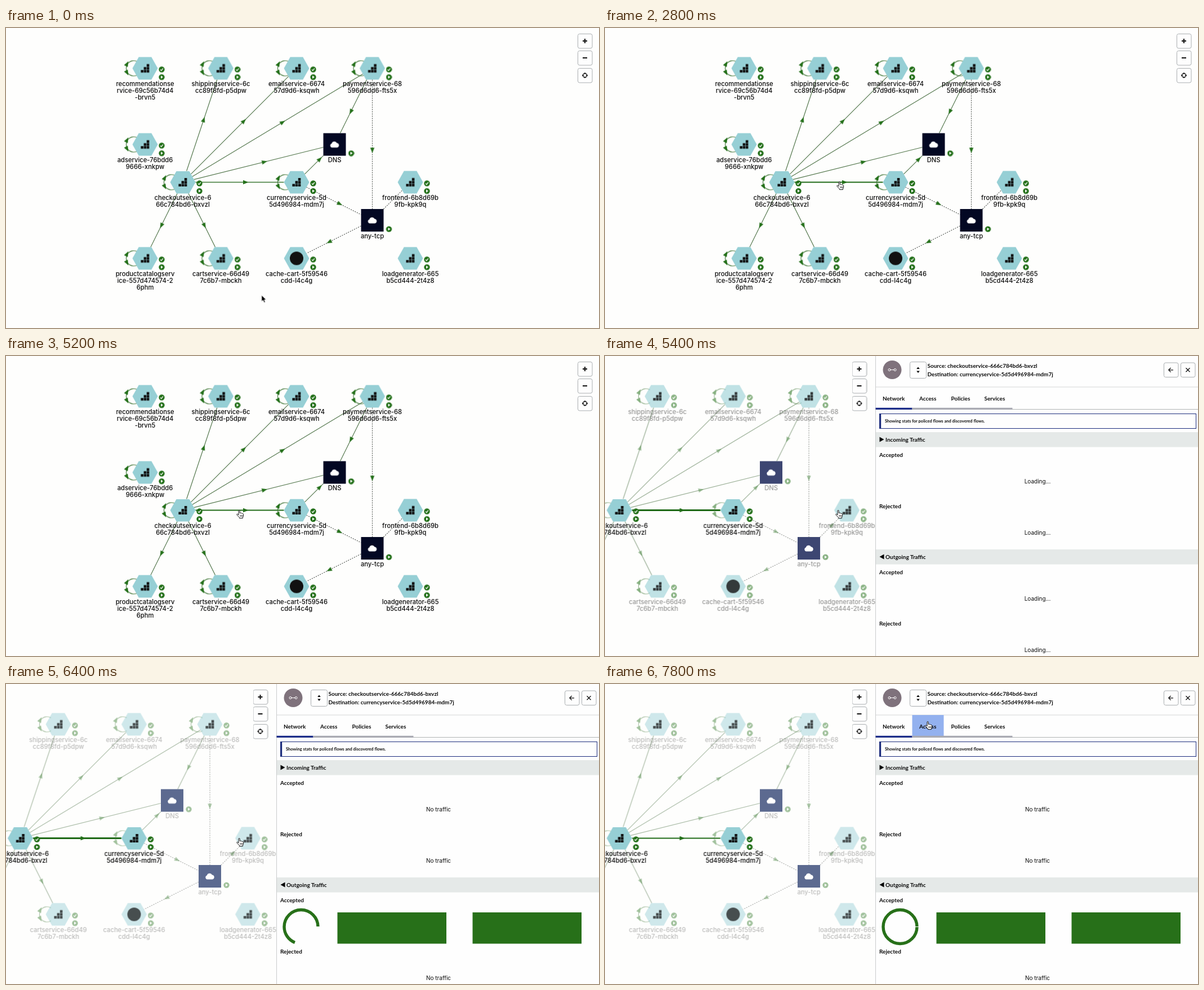
An HTML page that plays this animation: 1053x532 px, repeating every 8000 ms.

```html
<!DOCTYPE html>
<html lang="en">
<head>
<meta charset="utf-8">
<title>Service map</title>
<style>
html, body { margin: 0; width: 100%; height: 100%; overflow: hidden; background: #fefefd; }
svg { display: block; }
text { fill: #0c0c0c; }
.label { font: 500 11.2px Inter, sans-serif; text-anchor: middle; }
.note { font: 10px Inter, sans-serif; text-anchor: middle; }
.lato { font: 700 10px Lato, sans-serif; }
.info { font: 700 7.5px Lato, sans-serif; }
.hex { fill: #96cfd5; }
.box { fill: #030823; }
.edge { fill: none; stroke: #56794f; stroke-width: 1.2; }
.loop { fill: none; stroke: #457a3d; stroke-width: 1.1; }
.dots { stroke: #4a4f4a; stroke-width: 1.1; stroke-dasharray: 2 2; }
.tip, .badge { fill: #24701a; }
.mark { fill: none; stroke: #fff; stroke-width: 1.3; }
.btn { fill: #fefefe; stroke: #a9adb0; }
.ico { fill: none; stroke: #111; stroke-width: 2; }
.thin { stroke-width: 1.3; }

/* 2.5% of the loop is one 200 ms step */
.dim, .box, .main, .late, #graph, #tools, #panel, .wait, .done, #ring, #tab, #cursor, #arrow, #hand {
  animation: 8s step-end infinite;
}
.dim { animation-name: dim; }
.box { animation-name: box; }
.main { animation-name: main; }
.late { animation-name: late; }
#graph { animation-name: graph; }
#tools { animation-name: tools; }
#panel { animation-name: open; }
.wait { animation-name: wait; }
.done { animation-name: done; }
#ring { animation-name: ring; }
#tab { animation-name: tab; }
#cursor { animation-name: move; }
#arrow { animation-name: arrow; }
#hand { animation-name: hand; }

@keyframes dim { 0% { opacity: 1 } 67.5% { opacity: var(--a) } 70%, 100% { opacity: var(--b) } }
@keyframes box { 0% { fill: #030823 } 67.5% { fill: #3d4672 } 70%, 100% { fill: #5c6a90 } }
@keyframes main {
  0% { stroke-width: 1.3; stroke: #3b7733 }
  30% { stroke-width: 2.2; stroke: #1f6a17 }
  67.5% { stroke-width: 2.8; stroke: #1f6a17 }
  92.5%, 100% { stroke-width: 2.2; stroke: #1f6a17 }
}
@keyframes late { 0% { opacity: 0 } 67.5%, 100% { opacity: 1 } }
@keyframes graph { 0% { transform: none } 67.5%, 100% { transform: translate(-288.5px, 0) } }
@keyframes tools { 0% { transform: none } 67.5%, 100% { transform: translate(-576.5px, 0) } }
@keyframes open { 0% { opacity: 0 } 67.5%, 100% { opacity: 1 } }
@keyframes wait { 0% { opacity: 1 } 70%, 100% { opacity: 0 } }
@keyframes done { 0% { opacity: 0 } 70%, 100% { opacity: 1 } }
@keyframes tab { 0% { opacity: 0 } 95%, 100% { opacity: 1 } }
@keyframes ring {
  0% { stroke-dasharray: 0 200 }
  75% { stroke-dasharray: 15 200 }
  77.5% { stroke-dasharray: 43 200 }
  80% { stroke-dasharray: 69 200 }
  82.5% { stroke-dasharray: 83 200 }
  85% { stroke-dasharray: 92 200 }
  87.5% { stroke-dasharray: 97 200 }
  90%, 100% { stroke-dasharray: 100 200 }
}
@keyframes move {
  0% { transform: translate(453.5px, 473.5px) }
  20% { transform: translate(447px, 430px) }
  22.5% { transform: translate(433.5px, 365.5px) }
  25% { transform: translate(422px, 304px) }
  27.5% { transform: translate(415px, 280px) }
  30% { transform: translate(411px, 272px) }
  62.5% { transform: translate(409px, 273px) }
  92.5% { transform: translate(468px, 188px) }
  95% { transform: translate(562px, 76px) }
  97.5%, 100% { transform: translate(568px, 66px) }
}
@keyframes arrow { 0% { opacity: 1 } 30% { opacity: 0 } 92.5% { opacity: 1 } 95%, 100% { opacity: 0 } }
@keyframes hand { 0% { opacity: 0 } 30% { opacity: 1 } 92.5% { opacity: 0 } 95%, 100% { opacity: 1 } }
</style>
</head>
<body>
<svg width="1053" height="532" viewBox="0 0 1053 532">
  <g id="graph"></g>
  <g id="tools">
    <rect class="btn" x="1015.5" y="10.5" width="25.5" height="25.5" rx="3"/>
    <rect class="btn" x="1015.5" y="40.5" width="25.5" height="25.5" rx="3"/>
    <rect class="btn" x="1015.5" y="71.5" width="25.5" height="25.5" rx="3"/>
    <path class="ico" d="M1024 23h8M1028 19v8M1024 53h8"/>
    <circle class="ico thin" cx="1028" cy="84" r="3.6"/>
    <path class="ico thin" d="M1028 79v3M1028 86v3M1023 84h3M1030 84h3"/>
  </g>
  <g id="panel"></g>
  <g id="cursor">
    <path id="arrow" d="M.3.3V11.6L3 9.2 4.9 13.4 6.9 12.5 5.1 8.5H8.6Z" fill="#000" stroke="#fff" stroke-width=".8"/>
    <g id="hand" stroke="#111" stroke-linejoin="round">
      <path fill="#fff" d="M4 9V1.8Q4 .6 5 .6 6.2.6 6.2 1.8V5.5Q8 4.9 8.4 5.8 10 5.2 10.5 6.4 12.5 6 12.6 7.6V10Q12.6 12 11.4 13V14.6H5.4V13.2Q3 11 1 8.6.4 7.4 1.5 7.2 2.6 7 4 9Z"/>
      <path d="M7 9v3M8.9 9v3M10.7 9v3" stroke-width=".8"/>
    </g>
  </g>
</svg>
<script>
const el = id => document.getElementById(id);
const text = (x, y, s, cls) => `<text x="${x}" y="${y}" class="${cls}">${s}</text>`;

// id: [x, y, label lines, kind]; "loop" marks a self-connected pod
const nodes = {
  recommend: [247, 71.5, 'recommendationse|rvice-69c56b74d4|-brvn5', 'loop'],
  shipping: [381.5, 71.5, 'shippingservice-6c|cc89f8fd-p5dpw', 'loop'],
  email: [516, 71.5, 'emailservice-6674|57d9d6-ksqwh', 'loop'],
  payment: [650.5, 71.5, 'paymentservice-68|596d6dd6-fts5x', 'loop'],
  ad: [247, 206.5, 'adservice-76bdd6|9666-xnkpw', 'loop'],
  dns: [583.5, 206.5, 'DNS', 'cloud'],
  checkout: [314, 273.5, 'checkoutservice-6|66c784bd6-bxvzl', 'loop'],
  currency: [516, 273.5, 'currencyservice-5d|5d496984-mdm7j', 'loop'],
  frontend: [718, 273.5, 'frontend-6b8d69b|9fb-kpk9q', 'pod'],
  tcp: [650.5, 341, 'any-tcp', 'cloud'],
  catalog: [247, 408.5, 'productcatalogserv|ice-557d474574-2|6phm', 'loop'],
  cart: [381.5, 408.5, 'cartservice-66d49|7c6b7-mbckh', 'loop'],
  cache: [516, 408.5, 'cache-cart-5f59546|cdd-l4c4g', 'disc'],
  load: [718, 408.5, 'loadgenerator-665|b5cd444-2t4z8', 'pod']
};
const solid = 'checkout shipping,checkout email,checkout payment,checkout dns,checkout currency,checkout catalog,checkout cart,payment dns,currency dns';
const dotted = 'payment tcp,currency tcp,tcp cache,tcp frontend';
const focus = ['checkout', 'currency'];

const dim = (a, b, body) => `<g class="dim" style="--a:${a};--b:${b}">${body}</g>`;
const tip = (x, y, deg, cls = '') =>
  `<path class="tip ${cls}" d="M5 0L-4.5-3.8V3.8Z" transform="translate(${x} ${y}) rotate(${deg})"/>`;

// Point where a ray from the node centre leaves its outline
function rim([x, y, , kind], dx, dy) {
  const ax = Math.abs(dx), ay = Math.abs(dy);
  const s = 1 / (kind === 'cloud' ? Math.max(ax, ay) / 20 : Math.max(ay / 20, ax / 22.5 + ay / 40));
  return `${x + dx * s} ${y + dy * s}`;
}

function edge(pair, cls) {
  const [a, b] = pair.split(' ');
  const [x1, y1] = nodes[a], [x2, y2] = nodes[b];
  const dx = x2 - x1, dy = y2 - y1, len = Math.hypot(dx, dy);
  const main = focus.includes(a) && focus.includes(b);
  const line = `<path class="edge ${cls} ${main ? 'main' : ''}" d="M${rim(nodes[a], dx, dy)}L${rim(nodes[b], -dx, -dy)}"/>`;
  const head = tip((x1 + x2) / 2 + dx / len * 10.5, (y1 + y2) / 2 + dy / len * 10.5,
    Math.atan2(dy, dx) * 180 / Math.PI, b === 'frontend' ? 'late' : '');
  return main ? line + head : dim(.62, .5, line) + dim(.4, .36, head);
}

function icon(kind) {
  if (kind === 'cloud')
    return '<path fill="#fff" d="M-4.5 5.5A3.6 3.6 0 0 1-5.2-1.5 5 5 0 0 1 4-2.6 4.1 4.1 0 0 1 4.4 5.5Z"/>';
  if (kind === 'disc') return '<circle r="12" fill="#111"/>';
  let d = '';
  for (let r = 0; r < 3; r++)
    for (let c = 2 - r; c < 3; c++) d += `M${c * 5.2 - 7.6} ${r * 5.2 - 7.4}h4.6v4.6h-4.6z`;
  return `<path fill="#111" d="${d}"/>`;
}

function node([id, [x, y, label, kind]]) {
  const cloud = kind === 'cloud', lit = focus.includes(id);
  const fade = (a, b, s) => lit ? s : dim(a, b, s);
  const loop = kind === 'loop' ? dim(.55, .42,
    '<path class="loop" d="M-13-11.5A13.5 13.5 0 1 0-13 11.5"/>' + tip(-32, -8, -62) + tip(-32, 8, 62)) : '';
  const shape = cloud ? '<rect class="box" x="-20" y="-20" width="40" height="40"/>'
    : fade(.6, .45, '<path class="hex" d="M-22.5 0L-11.25-20H11.25L22.5 0 11.25 20H-11.25Z"/>');
  const pic = cloud ? icon(kind) : fade(.8, .72, icon(kind));
  const check = cloud ? '' : '<circle class="badge" cx="29.5" cy="2" r="5.2"/><path class="mark" d="M27 2.2l1.8 1.8 3.2-3.8"/>';
  const play = '<circle class="badge" cx="29.5" cy="15.6" r="5.2"/><path fill="#fff" d="M28 13l4 2.6-4 2.6z"/>';
  const lines = label.split('|').map((s, i) => text(0, 31.7 + i * 11.7, s, 'label')).join('');
  const body = `<g transform="translate(${x} ${y})">${loop}${shape}${pic}${fade(.52, .42, check + play)}${fade(.42, .27, lines)}</g>`;
  // nodes pushed off the left side vanish with their labels
  return x < 288.5 ? dim(0, 0, body) : body;
}

el('graph').innerHTML =
  solid.split(',').map(p => edge(p, '')).join('') +
  dotted.split(',').map(p => edge(p, 'dots')).join('') +
  Object.entries(nodes).map(node).join('');

const rect = (x, y, w, h, fill) => `<rect x="${x}" y="${y}" width="${w}" height="${h}" fill="${fill}"/>`;
const button = (x, y, w, h) => `<rect class="btn" x="${x}" y="${y}" width="${w}" height="${h}" rx="3"/>`;
const lato = (x, y, s) => text(x, y + 3.6, s, 'lato');
const status = (y, empty) =>
  `<g class="${empty ? 'wait' : 'wait'}">${text(768, y + 3.6, 'Loading...', 'note')}</g>` +
  (empty ? text(768, y + 3.6, 'No traffic', 'note done') : '');
const section = (y, title, arrow, empty) =>
  rect(481, y - 13, 572, 26.5, '#e5e9e8') + `<path d="${arrow}"/>` + lato(498, y, title) +
  lato(487, y + 27.5, 'Accepted') + status(y + 74.5, empty) +
  lato(487, y + 118, 'Rejected') + status(y + 165, true);

el('panel').innerHTML =
  rect(480, 0, 573, 532, '#fefefe') + rect(480, 0, 1, 532, '#c9cccc') +
  '<circle cx="510" cy="24.5" r="16.5" fill="#7f727c"/>' +
  '<path d="M506 24.5h8" stroke="#fff"/><g fill="none" stroke="#fff"><circle cx="505" cy="24.5" r="2"/><circle cx="515" cy="24.5" r="2"/></g>' +
  button(541.5, 10.5, 29, 29) + '<path d="M553.2 23L556 19.5l2.8 3.5zM553.2 26.5l2.8 3.5 2.8-3.5z"/>' +
  lato(572.5, 17.5, 'Source: checkoutservice-666c784bd6-bxvzl') +
  lato(572.5, 32, 'Destination: currencyservice-5d5d496984-mdm7j') +
  button(992.5, 12, 25.5, 25.5) + button(1022.5, 12, 25.5, 25.5) +
  '<path class="ico thin" d="M1009 24.8h-8M1004.6 21l-3.8 3.8 3.8 3.8M1031.5 21.3l7 7M1038.5 21.3l-7 7"/>' +
  rect(481, 54.5, 572, 1, '#d5d8d8') +
  `<g id="tab">${rect(545.5, 55, 56, 37, '#93b1ef')}</g>` +
  rect(481, 94, 572, 1.2, '#b9bcbc') + rect(480.5, 91.8, 65, 3.2, '#1a2b88') + rect(545.5, 91.8, 178, 3.2, '#a9aab2') +
  lato(493, 75, 'Network') + lato(558, 75, 'Access') + lato(614.5, 75, 'Policies') + lato(673.5, 75, 'Services') +
  '<rect x="487.5" y="102.5" width="562" height="26" fill="#fefefe" stroke="#1c2c7c"/>' + rect(487, 102, 3.2, 27, '#1c2c7c') +
  text(497, 117.7, 'Showing stats for policed flows and discovered flows.', 'info') +
  section(148, 'Incoming Traffic', 'M487.5 143.5l8 4.5-8 4.5z', true) +
  section(356, 'Outgoing Traffic', 'M495.5 351.5l-8 4.5 8 4.5z', false) +
  '<g class="done">' + rect(588.5, 405, 193.5, 55.5, '#277019') + rect(828.5, 405, 193.5, 55.5, '#277019') +
  '<path id="ring" pathLength="100" fill="none" stroke="#277019" stroke-width="5.4" d="M554 430.5A30 30 0 0 0 494 430.5 30 30 0 0 0 554 430.5"/>' +
  rect(550, 430, 8, 1, '#fefefe') + '</g>';
</script>
</body>
</html>
```
